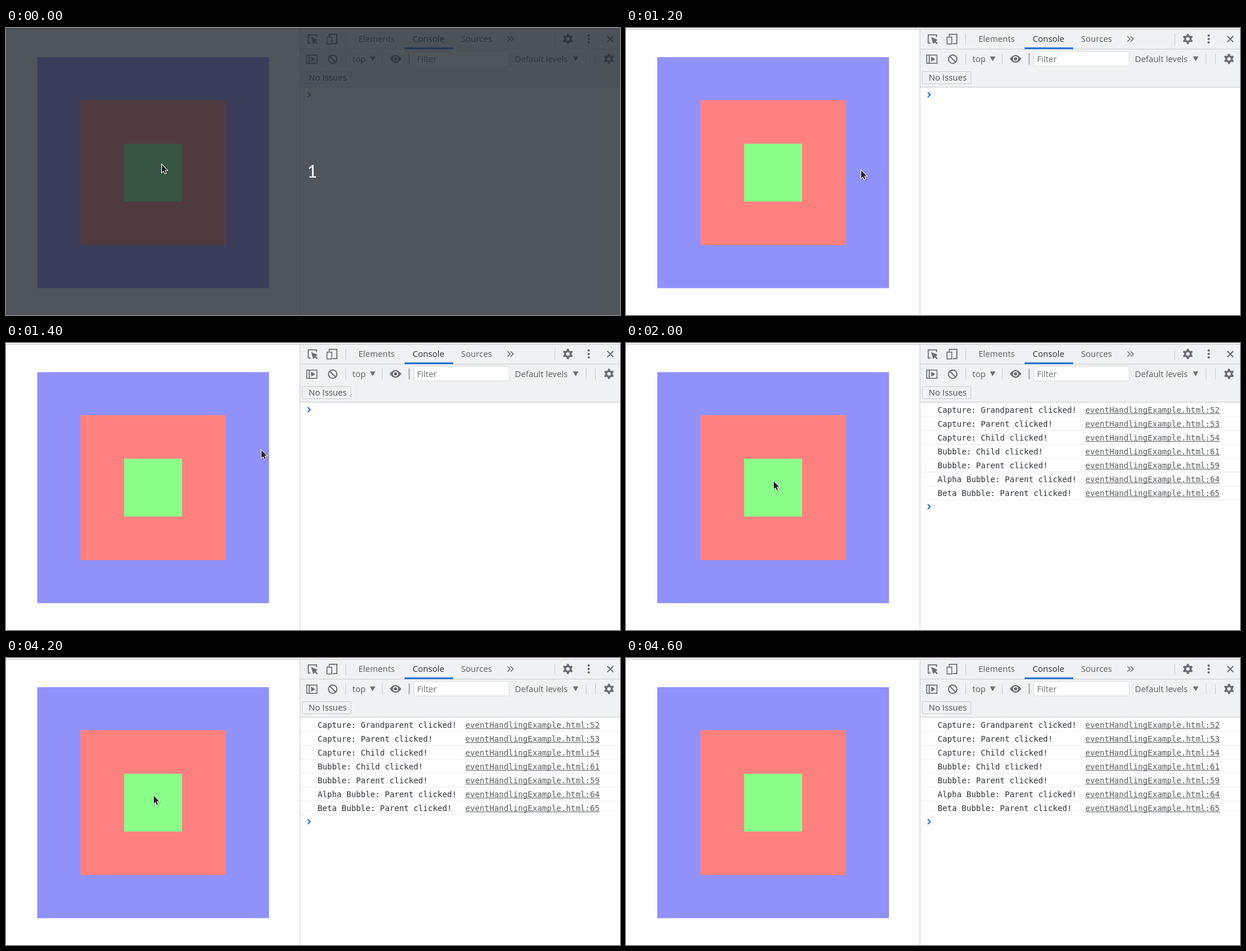
Recreate the animation shown at these times as an HTML page with a canvas. Size 1060x497 px, loop 5500 ms.

```html
<!DOCTYPE html>
<html lang="en">
<head>
<meta charset="utf-8">
<title>Event capturing and bubbling</title>
<style>
html, body { margin: 0; width: 100%; height: 100%; overflow: hidden; background: #fefefe; }
canvas { display: block; }
</style>
</head>
<body>
<canvas id="stage" width="1060" height="497"></canvas>
<script>
const ctx = document.getElementById('stage').getContext('2d');
const LOOP = 5500, STEP = 100;
const SWEEP = 1200, REST = 1600, CLICK = 2000, PRESS = 4200, LEAVE = 4400, GONE = 4600;
const UI = '14.6px "Open Sans", sans-serif';
const MONO = '13.76px "DejaVu Sans Mono", monospace';
const PAGE = '#fefefe', BAR = '#f0f1f3', EDGE = '#cacdd1';
const GRAY = '#6b6e73', DARK = '#5a5d62', BLUE = '#1f70d0';

const LOGS = [
  'Capture: Grandparent:52', 'Capture: Parent:53', 'Capture: Child:54',
  'Bubble: Child:61', 'Bubble: Parent:59',
  'Alpha Bubble: Parent:64', 'Beta Bubble: Parent:65'
];

function rect(x, y, w, h, color) {
  ctx.fillStyle = color;
  ctx.fillRect(x, y, w, h);
}

function box(x, y, w, h, color = GRAY, width = 1.6) {
  ctx.strokeStyle = color;
  ctx.lineWidth = width;
  ctx.strokeRect(x, y, w, h);
}

function text(str, x, y, color = DARK, font = UI) {
  ctx.font = font;
  ctx.fillStyle = color;
  ctx.fillText(str, x, y);
}

function trace(points, close) {
  ctx.beginPath();
  points.forEach(([x, y]) => ctx.lineTo(x, y));
  if (close) ctx.closePath();
}

function line(points, color = GRAY, width = 1.8, close = false) {
  trace(points, close);
  ctx.strokeStyle = color;
  ctx.lineWidth = width;
  ctx.stroke();
}

function fill(points, color = GRAY) {
  trace(points, true);
  ctx.fillStyle = color;
  ctx.fill();
}

function disc(x, y, r, color = GRAY) {
  ctx.beginPath();
  ctx.arc(x, y, r, 0, Math.PI * 2);
  ctx.fillStyle = color;
  ctx.fill();
}

function chevron(x, y, r, color, width) {
  line([[x - r / 2, y - r], [x + r / 2, y], [x - r / 2, y + r]], color, width);
}

function triangle(x, y, r, angle) {
  fill([0, 1, 2].map(i => {
    const a = angle + i * Math.PI * 2 / 3;
    return [x + r * Math.cos(a), y + r * Math.sin(a)];
  }));
}

function gear(x, y) {
  const pts = [];
  for (let i = 0; i < 24; i++) {
    const r = i % 4 < 2 ? 9 : 6.4, a = (i - 0.5) * Math.PI / 12 + Math.PI / 2;
    pts.push([x + r * Math.cos(a), y + r * Math.sin(a)]);
  }
  fill(pts);
  disc(x, y, 3, BAR);
}

function picker(x, y) {
  line([[x + 4, y + 14.4], [x, y + 14.4], [x, y], [x + 14.4, y], [x + 14.4, y + 4]]);
  fill([[x + 5, y + 4], [x + 16, y + 8.5], [x + 8.5, y + 16]]);
  line([[x + 10, y + 10], [x + 15.5, y + 15.5]], GRAY, 2.5);
}

function devices(x, y) {
  line([[x + 4, y + 4], [x + 4, y], [x + 17, y], [x + 17, y + 16.4], [x + 10, y + 16.4]]);
  box(x, y + 5, 8.2, 11.8);
}

function sidebar(x, y) {
  box(x, y, 17.6, 14.4);
  line([[x + 4.3, y], [x + 4.3, y + 14]]);
  triangle(x + 10, y + 7.2, 4.8, 0);
}

function clearIcon(x, y) {
  disc(x, y, 8.3);
  disc(x, y, 6.3, BAR);
  line([[x - 5, y - 5], [x + 5, y + 5]], GRAY, 2);
}

function eye(x, y) {
  ctx.beginPath();
  ctx.moveTo(x - 10, y);
  ctx.quadraticCurveTo(x, y - 13.5, x + 10, y);
  ctx.quadraticCurveTo(x, y + 13.5, x - 10, y);
  ctx.fillStyle = GRAY;
  ctx.fill();
  disc(x, y, 4.6, BAR);
  disc(x, y, 2.8);
}

function cross(x, y, r) {
  for (const s of [-1, 1]) line([[x - r, y - r * s], [x + r, y + r * s]], GRAY, 2);
}

function page() {
  rect(0, 0, 1060, 497, PAGE);
  rect(0, 0, 1060, 2, '#f7f5f6');
  rect(0, 2, 1060, 1, '#c9c5c7');
  const squares = { '#9191fa': 400, '#ff817f': 251, '#89ff89': 100 };
  for (const [color, size] of Object.entries(squares)) {
    rect(254 - size / 2, 250.5 - size / 2, size, size, color);
  }
}

function devtools() {
  rect(508, 3, 552, 99, BAR);
  for (const y of [36, 102]) rect(508, y, 552, 1, EDGE);
  rect(507, 3, 1, 494, EDGE);
  rect(688, 33.6, 84, 3, BLUE);

  // tabs
  for (const x of [586, 947]) rect(x, 10, 1, 19, EDGE);
  picker(521.8, 11.8);
  devices(554.2, 10.8);
  text('Elements', 608.5, 24);
  text('Console', 702, 24, '#2d3036');
  text('Sources', 785.5, 24);
  for (const x of [868, 873.5]) chevron(x, 19, 4.5, GRAY, 1.7);
  gear(970, 19);
  for (const y of [13, 19, 25]) disc(1006, y, 2);
  cross(1043.3, 19.2, 5.2);

  // toolbar
  for (const x of [586, 649, 1001, 1017]) rect(x, 44, 1, 19, EDGE);
  rect(695, 44, 2, 19, '#a9acb0');
  sidebar(519.2, 46.8);
  clearIcon(564, 54);
  text('top', 598, 59);
  eye(672.5, 53.5);
  rect(704, 40, 165, 26, PAGE);
  box(704.5, 40.5, 164, 25, '#dddfe2', 1);
  text('Filter', 709.5, 59, '#6c6f73');
  text('Default levels', 878.5, 59);
  for (const x of [633, 983.5]) triangle(x, 52, 5.4, Math.PI / 2);
  gear(1041, 53.5);

  ctx.beginPath();
  ctx.roundRect(511.5, 75.5, 84, 21, 2);
  ctx.strokeStyle = EDGE;
  ctx.lineWidth = 1;
  ctx.stroke();
  text('No Issues', 522.5, 91, '#4b4e53');
}

function consoleRows(logs) {
  logs.forEach((log, i) => {
    const y = 121 + 24 * i, cut = log.lastIndexOf(':');
    text(log.slice(0, cut) + ' clicked!', 538, y, '#30343b', MONO);
    text('eventHandlingExample.html' + log.slice(cut), 793, y, DARK, MONO);
    rect(793, y + 1, 232, 1, DARK);
    rect(508, y + 6, 552, 1, '#efefef');
  });
  chevron(523, 115.5 + 24 * logs.length, 4.2, BLUE, 2);
}

function bezier(p, a, b, c) {
  const q = 1 - p;
  return q * q * a + 2 * q * p * b + p * p * c;
}

// The pointer loops out to the right, rests on the child, then leaves upwards.
function pointerAt(t) {
  if (t < SWEEP) return [268, 234];
  if (t >= LEAVE) return [129, 36];
  const stepped = Math.floor((t - SWEEP) / STEP) * STEP;
  const p = Math.min(1, stepped / (REST - SWEEP));
  return [bezier(p, 405, 550, 254), bezier(p, 244, 126, 237) - (t >= PRESS ? 1 : 0)];
}

function pointer([x, y]) {
  const shape = [[1, 2.5], [1, 16], [4, 13.2], [6.5, 18.3], [8.4, 17.5], [6.1, 12.3], [10.3, 12.3]];
  ctx.save();
  ctx.translate(Math.round(x), Math.round(y));
  ctx.shadowColor = 'rgba(0,0,0,.3)';
  ctx.shadowBlur = 2;
  ctx.shadowOffsetX = ctx.shadowOffsetY = 1;
  line(shape, '#fff', 2, true);
  ctx.shadowColor = 'transparent';
  fill(shape, '#211f24');
  ctx.restore();
}

function draw(t) {
  page();
  devtools();
  consoleRows(t < CLICK ? [] : LOGS);
  if (t < 300) {
    rect(0, 0, 1060, 497, 'rgba(37,42,51,.8)');
    text('1', 520, 259, '#fff', '30px Lato, sans-serif');
  }
  if (t < GONE) pointer(pointerAt(t));
}

const start = performance.now();
function tick() {
  draw((performance.now() - start) % LOOP);
  requestAnimationFrame(tick);
}
tick();
</script>
</body>
</html>
```
